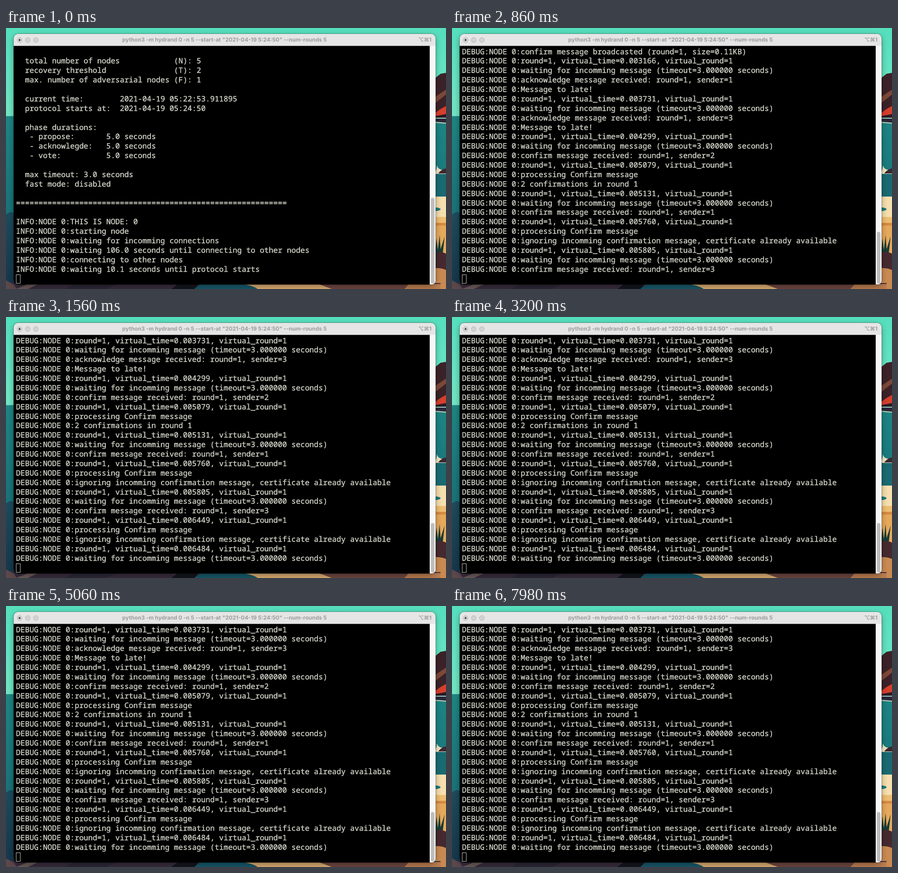
Recreate the animation shown at these times as an HTML page. Size 972 by 576 pixels, loop 8 s.

```html
<!DOCTYPE html>
<html lang="en">
<head>
<meta charset="utf-8">
<title>Terminal log</title>
<style>
  html, body { margin: 0; width: 100%; height: 100%; overflow: hidden; background: #000; }
  svg { display: block; width: 972px; height: 576px; }
  text { white-space: pre; text-rendering: geometricPrecision; }
  #rows {
    font: 500 16.64px "Noto Sans Mono", monospace; font-variant-ligatures: none;
    fill: #d3d3c9; stroke: #d3d3c9; stroke-width: .4;
  }
  .bar { font: 700 12.14px Inter, "DejaVu Sans", sans-serif; fill: #9c9c9c; }
</style>
</head>
<body>
<svg viewBox="0 0 972 576" xmlns="http://www.w3.org/2000/svg">
  <defs>
    <linearGradient id="sky" x2="0" y2="1">
      <stop offset="0" stop-color="#55dfbd"/><stop offset="1" stop-color="#72e6c4"/>
    </linearGradient>
    <linearGradient id="sea" x2="0" y2="1">
      <stop offset="0" stop-color="#1d8583"/><stop offset="1" stop-color="#17636e"/>
    </linearGradient>
    <linearGradient id="hill" x2="0" y2="1">
      <stop offset="0" stop-color="#1d4b5d"/><stop offset="1" stop-color="#15354a"/>
    </linearGradient>
    <filter id="blur" x="-5%" y="-5%" width="110%" height="110%">
      <feGaussianBlur stdDeviation="7"/>
    </filter>
  </defs>

  <g id="wallpaper">
    <rect width="972" height="196" fill="url(#sky)"/>
    <rect y="194.5" width="972" height="382" fill="url(#sea)"/>
    <path d="M0 411L10 406L20 409V576H0Z" fill="url(#hill)"/>

    <path d="M945 113L960 101L972 99V198H945Z" fill="#3b2228"/>
    <path d="M945 154L972 136V147L945 168Z" fill="#7d4838"/>
    <path d="M945 190L958 180L972 172V190L945 196Z" fill="#d63f2d"/>
    <path d="M945 195L972 190V200H945Z" fill="#2b1b27"/>
    <path d="M945 198H972V200H945Z" fill="#9fd9c8"/>
    <path d="M945 200H972V209L945 206Z" fill="#2b2639"/>
    <path d="M945 207L972 209V211L945 209Z" fill="#cfd3ba"/>
    <path d="M945 322Q951 318 952 303Q955 316 972 312V324H945Z" fill="#f4e6c4"/>
    <path d="M955 321Q962 311 972 310V321Z" fill="#3b2830"/>
    <rect x="945" y="322" width="27" height="51" fill="#1a6a72"/>
    <rect x="945" y="372" width="27" height="60" fill="#f6dfae"/>
    <ellipse cx="948" cy="400" rx="12" ry="4" fill="#21797c"/>
    <rect x="945" y="417" width="27" height="14" fill="#eebd72"/>
    <rect x="945" y="430" width="27" height="6" fill="#d68b43"/>
    <rect x="945" y="436" width="27" height="64" fill="#e6a95c"/>
    <path d="M948 496L951 464L954 490L958 457L960 488L969 460L965 496Z" fill="#173b36"/>
    <path d="M945 497Q958 491 972 498V536H945Z" fill="#46292f"/>
    <path d="M945 530Q960 529 972 534V576H930Z" fill="#c98a52"/>

    <rect y="563" width="960" height="13" fill="#382c3b"/>
    <path d="M0 557L17 566L24 576H0Z" fill="#5c474b"/>
    <path d="M22 576L50 565H72L48 576Z" fill="#6b5958"/>
    <path d="M130 576L150 565H245L222 576Z" fill="#2b2636"/>
    <path d="M365 576L380 565H425L418 576Z" fill="#12151c"/>
    <path d="M416 576Q424 568 432 565H520Q545 568 556 576Z" fill="#175768"/>
    <path d="M520 565H700L720 576H556Q545 568 520 565Z" fill="#d9ab70"/>
    <path d="M690 565H890L880 576H720Z" fill="#6e4640"/>
    <path d="M890 565H960V576H880Z" fill="#b97c4f"/>
  </g>

  <g id="window">
    <rect x="17" y="17" width="932" height="553" rx="10" fill-opacity=".35" filter="url(#blur)"/>
    <rect x="16.5" y="12.5" width="933" height="554" rx="10.5" fill="none" stroke="#000" stroke-opacity=".28"/>
    <rect x="17" y="13" width="932" height="553" rx="10" fill="#e6e5e5"/>
    <path d="M17 39.6H936V566H27Q17 566 17 556Z" fill="#000"/>
    <path d="M936 39.6H949V556Q949 566 939 566H936Z" fill="#f7f7f7"/>
    <g fill="#d3d3d3" stroke="#b3b3b3">
      <circle cx="30" cy="26.5" r="5.3"/><circle cx="48" cy="26.5" r="5.3"/><circle cx="66" cy="26.5" r="5.3"/>
    </g>
    <circle cx="30" cy="26.5" r="2" fill="#333"/>
    <text class="bar" x="482.7" y="30.3" text-anchor="middle">python3 -m hydrand 0 -n 5 --start-at "2021-04-19 5:24:50" --num-rounds 5</text>
    <text class="bar" x="940" y="29.8" text-anchor="end">⌥⌘1</text>
    <rect id="thumb" x="938.5" width="8" rx="4" fill="#bdbdbd"/>
  </g>

  <g id="rows"></g>
  <rect id="cursor" x="22.5" y="544.5" width="9" height="19" fill="none" stroke="#c8c8c0"/>
</svg>

<script>
const LOOP = 8000, ROWS = 25, PITCH = 20.87, BASE = 57.6;
const HISTORY = 44; // lines scrolled away before the first one listed

const info = s => "INFO:NODE 0:" + s;
const debug = s => "DEBUG:NODE 0:" + s;
const clock = us => debug(`round=1, virtual_time=0.00${us}, virtual_round=1`);
const wait = debug("waiting for incomming message (timeout=3.000000 seconds)");
const got = (kind, from) => debug(`${kind} message received: round=1, sender=${from}`);
const sent = (kind, size) => debug(`${kind} message broadcasted (round=1, size=${size}KB)`);
const handle = kind => debug(`processing ${kind} message`);
const late = debug("Message to late!");
const ignored = debug("ignoring incomming confirmation message, certificate already available");
const field = (name, col, value) => name.padEnd(col) + value;

const log = [
  "",
  field("  total number of nodes", 35, "(N): 5"),
  field("  recovery threshold", 35, "(T): 2"),
  field("  max. number of adversarial nodes", 35, "(F): 1"),
  "",
  field("  current time:", 23, "2021-04-19 05:22:53.911895"),
  field("  protocol starts at:", 23, "2021-04-19 05:24:50"),
  "",
  "  phase durations:",
  field("   - propose:", 20, "5.0 seconds"),
  field("   - acknowlegde:", 20, "5.0 seconds"),
  field("   - vote:", 20, "5.0 seconds"),
  "",
  "  max timeout: 3.0 seconds",
  "  fast mode: disabled",
  "",
  "=".repeat(60),
  "",
  info("THIS IS NODE: 0"),
  info("starting node"),
  info("waiting for incomming connections"),
  info("waiting 106.0 seconds until connecting to other nodes"),
  info("connecting to other nodes"),
  info("waiting 10.1 seconds until protocol starts"),
  info("protocol start"),
  info("startup completed"),
  info("ROUND CHANGED, now in: round=1, phase=Phase.Propose"),
  debug("running leader selection: excluding previous leaders []"),
  debug("running leader selection: excluding failed nodes set()"),
  info("NODE 4 leader is leader for this round (1)"),
  clock("0539"), wait, got("propose", 4),
  clock("1102"), handle("Propose"),
  info("NEW BEACON (round=1): c8857545ee175a9f87d9843b43f49e3dec29c665ed8d8bc0b900dd300"),
  "c920d28",
  sent("acknowledge", "0.23"),
  clock("1813"), wait, got("acknowledge", 2),
  clock("2444"), handle("Acknowledge"),
  debug("2 acknowledgements in round 1"),
  handle("Confirm"),
  sent("confirm", "0.11"),
  clock("3166"), wait, got("acknowledge", 1), late,
  clock("3731"), wait, got("acknowledge", 3), late,
  clock("4299"), wait, got("confirm", 2),
  clock("5079"), handle("Confirm"),
  debug("2 confirmations in round 1"),
  clock("5131"), wait, got("confirm", 1),
  clock("5760"), handle("Confirm"), ignored,
  clock("5805"), wait, got("confirm", 3),
  clock("6449"), handle("Confirm"), ignored,
  clock("6484"), wait
];

// Hard scroll jumps: start time, first visible line, lines shown
const jumps = [[0, 0, 24], [720, 17, 25], [820, 45, 24], [960, 50, 24]];

const $ = id => document.getElementById(id);
const rows = Array.from({ length: ROWS }, (_, i) => {
  const row = document.createElementNS("http://www.w3.org/2000/svg", "text");
  row.setAttribute("x", 22);
  row.setAttribute("y", BASE + i * PITCH);
  return $("rows").appendChild(row);
});

let shown;
function draw(ms) {
  const jump = jumps.findLast(j => j[0] <= ms);
  if (jump === shown) return;
  shown = jump;
  const [, top, count] = jump;
  rows.forEach((row, i) => row.textContent = i < count ? log[top + i] : "");
  $("cursor").style.display = count < ROWS ? "" : "none";
  const scrolled = HISTORY + top;
  const y = 40 + 525 * scrolled / (scrolled + ROWS);
  $("thumb").setAttribute("y", y);
  $("thumb").setAttribute("height", 564 - y);
}

const start = performance.now();
function tick() {
  draw((performance.now() - start) % LOOP);
  requestAnimationFrame(tick);
}
tick();
</script>
</body>
</html>
```
